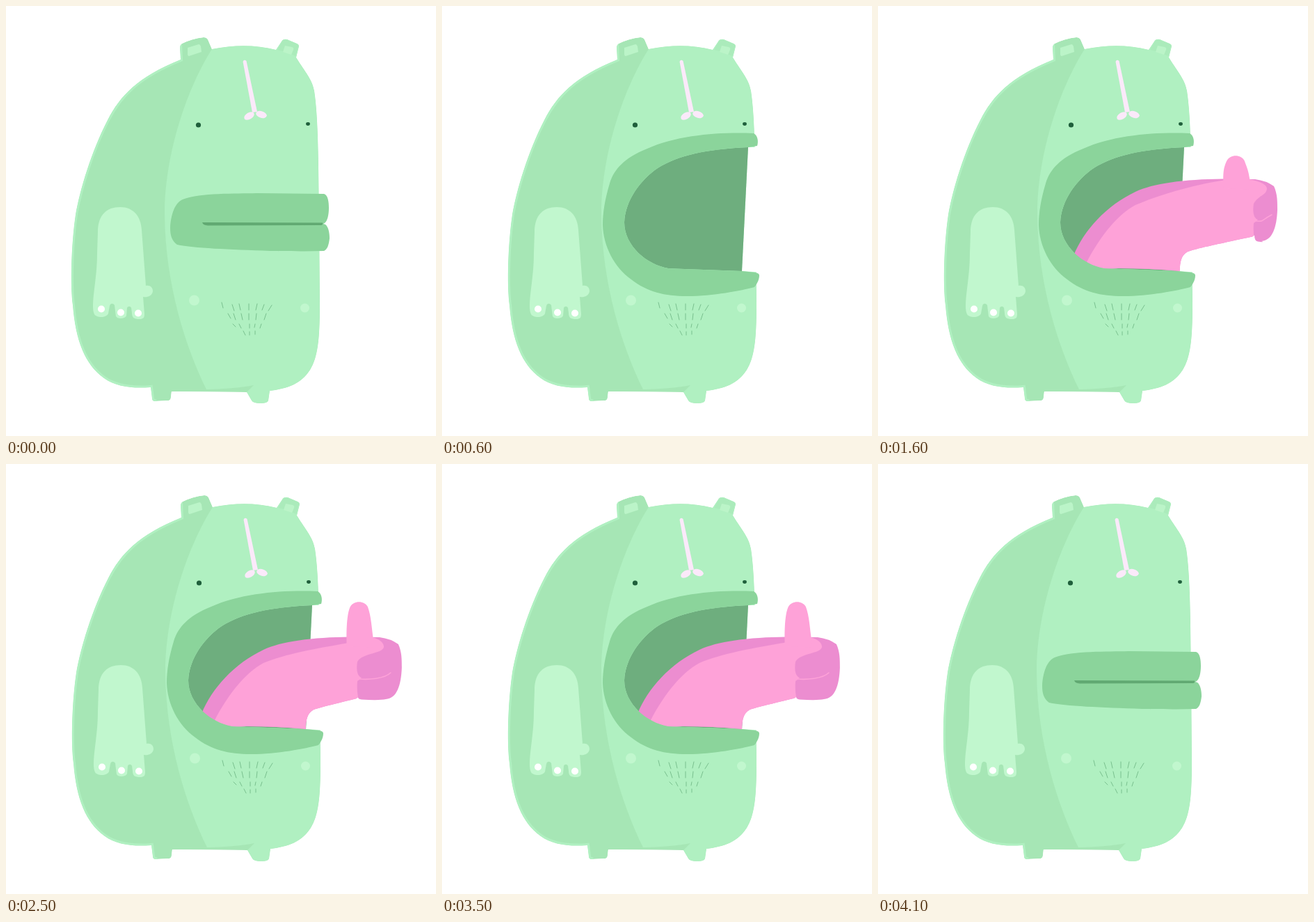
Animation, 618 px wide and 618 px high, one loop 4200 ms. Source, as an HTML page with a canvas:

```html
<!DOCTYPE html>
<html lang="en">
<head>
<meta charset="utf-8">
<title>Thumbs up</title>
<style>
html, body { margin: 0; width: 100%; height: 100%; overflow: hidden; background: #fff; }
canvas { display: block; width: 618px; height: 618px; }
</style>
</head>
<body>
<canvas id="stage"></canvas>
<script>
const SIZE = 618, LOOP = 4200;
const canvas = document.getElementById('stage');
const ctx = canvas.getContext('2d');
const dpr = window.devicePixelRatio || 1;
canvas.width = canvas.height = SIZE * dpr;

const C = {
  face: '#b0f0c1', side: '#a6e6b5', ear: '#abebbb', pale: '#c1f7ce', inner: '#bbf4c8',
  lip: '#8bd49b', deep: '#6eae7e', slit: '#61a972', hair: '#79c08e', eye: '#1f5f3b',
  nose: '#fbe9fa', pink: '#fea2d8', rose: '#ec8dd0', white: '#fff'
};

function fill(d, color) {
  ctx.fillStyle = color;
  ctx.fill(new Path2D(d));
}
function stroke(d, color, width) {
  ctx.strokeStyle = color;
  ctx.lineWidth = width;
  ctx.stroke(new Path2D(d));
}
function dot(x, y, rx, color, ry = rx, turn = 0) {
  ctx.fillStyle = color;
  ctx.beginPath();
  ctx.ellipse(x, y, rx, ry, turn, 0, Math.PI * 2);
  ctx.fill();
}
function clipped(d, paint) {
  ctx.save();
  ctx.clip(new Path2D(d));
  paint();
  ctx.restore();
}

// Body
const BACK = 'C189 102 164 129 146 164 C123 208 106 265 100 300 C94 340 92 400 96 430 ' +
  'C100 480 113 515 141 535 C158 547 180 550 208 548 L210 564 Q210 568 214 568';
const BODY = 'M251 77 ' + BACK + ' L234 567 Q237 566 237 562 L238 554 L346 555 L353 567 ' +
  'Q355 571 366 571 Q376 571 377 567 L379 553 C405 550 424 543 437 523 C448 505 451 480 451 430 ' +
  'L450 300 C449 230 449 160 443 122 C440 105 430 95 417 74 L421 58 Q421 55 418 54 L404 48 ' +
  'Q398 47 396 51 L388 63 Q345 52 296 62 L290 48 Q288 45 284 45 Q267 47 253 54 Q250 56 250 60 Z';
const FACE = 'M296 62 C262 115 228 210 228 300 C229 400 258 490 288 551 ' +
  'Q330 550 356 545 L345 556 L350 590 L500 590 L500 0 L296 0 Z';
const ARM = 'M132 325 C132 300 145 289 164 289 C183 289 194 302 195 322 L201 402 ' +
  'C207 401 211 404 211 410 C210 417 203 419 197 418 L199 443 C199 448 197 450 192 450 ' +
  'C184 450 181 448 181 441 L180 434 C179 431 175 431 174 434 L173 445 C171 450 160 450 158 446 ' +
  'L156 430 C154 427 150 427 149 431 L147 442 C144 449 130 448 127 443 C124 437 125 425 126 415 ' +
  'C129 390 131 375 131 355 Z';
// x, y, dx, dy of each hair
const HAIRS = [
  [310, 426, 2, 8], [325, 429, 3, 9], [335, 428, 2, 9], [349, 428, 0, 9], [361, 428, -2, 9],
  [371, 429, -3, 8], [382, 430, -5, 8],
  [319, 442, 4, 7], [327, 442, 3, 9], [338, 442, 2, 9], [349, 442, 0, 9], [360, 442, -1, 9], [374, 442, -3, 9],
  [326, 457, 4, 4], [335, 457, 3, 6], [350, 457, 0, 6], [358, 457, -1, 5], [367, 457, -2, 6],
  [341, 467, 3, 6], [350, 468, 0, 5], [358, 467, 0, 5]
];

function drawBody() {
  clipped(BODY, () => {
    fill(BODY, C.side);
    stroke('M250 56 L251 77 ' + BACK, C.face, 6);
    fill(FACE, C.face);
  });
  fill('M390 63 L397 51 Q399 48 404 49 L417 54 Q420 55 420 58 L416 72 Q404 66 390 63 Z', C.ear);
  fill('M261 60 L277 55 Q279 55 280 58 L281 66 L263 72 Q261 72 261 69 Z', C.inner);
  fill('M401 57 L411 59 Q414 60 413 63 L410 70 L398 66 Z', C.inner);
  fill(ARM, C.pale);
  dot(137, 435.5, 5, C.white);
  dot(165, 440.5, 5, C.white);
  dot(190, 441.5, 5, C.white);

  fill('M340.5 80 Q342 76 345.5 79 L361 152 L354 153 Z', C.nose);
  dot(349.5, 158, 8, C.nose, 4.8, -0.55);
  dot(367, 156, 8, C.nose, 4.8, 0.3);
  dot(276.5, 171, 3.6, C.eye);
  dot(434, 169.5, 2.9, C.eye, 2.4);
  dot(270.5, 423, 7.5, C.pale);
  dot(429.5, 434, 6.5, C.pale);
  stroke(HAIRS.map(([x, y, dx, dy]) => `M${x} ${y} l${dx} ${dy}`).join(''), C.hair, 1);
}

// Mouth
function closedMouth() {
  fill('M236 318 C237 300 243 282 254 278 C280 268 330 270 360 269 L457 270 C463 272 464 282 464 290 ' +
    'C464 300 462 309 458 312 L456 313 L459 314 C463 317 465 325 465 334 C464 343 462 350 457 352 ' +
    'C430 353 400 352 380 352 C320 350 270 348 246 343 C238 337 236 330 236 318 Z', C.lip);
  fill('M282 311 L455 311.5 Q456 314 453 315 L290 315.5 Q283 315 282 311 Z', C.slit);
}

const INNER = 'L431 381 L335 377.5 L325 377 C295 372 262 345 262 311 C263 280 285 250 310 233 C340 214 380 206 440 203';
const LIPS = 'M448 183 C400 181 340 185 295 205 C262 218 247 235 241 255 C234 278 231 298 231 315 ' +
  'C232 345 247 375 272 393 C295 411 320 417 352 417 C390 417 430 409 449 404 C454 398 456 392 456 387 ' +
  'Q456 384 450 383 ' + INNER + ' L453 201 C455 195 454 186 448 183 Z';

function openMouth(tongue) {
  fill('M440 203 L462 203 L462 383 L431 381 Z', C.white);
  fill('M440 203 ' + INNER + ' Z', C.deep);
  if (tongue) tongue();
  fill(LIPS, C.lip);
}

function halfMouth() {
  ctx.save();
  ctx.translate(232, 215);
  ctx.scale(229 / 225, 242 / 234);
  ctx.translate(-231, -183);
  openMouth();
  ctx.restore();
}

// Tongue
const ROOT = ' Q390 377 345 377 L325 378 Q310 376 298 367 Z';
const TOP = 'M281 359 C296 322 328 287 370 267 C395 255 ';
const BAND = 'M300 368 C320 330 345 299 370 286 C400 273 450 ';
const under = x => ` C465 347 ${x + 15} 351 ${x + 10} 354 C${x + 3} 358 ${x} 367 ${x} 381` + ROOT;

function plainTongue(outline, light) {
  fill(outline, C.rose);
  clipped(outline, () => fill(light, C.pink));
}
const small = () => plainTongue(
  'M278 356 C305 338 340 330 375 330 C412 330 445 345 445 362 C445 372 439 382 433 382' + ROOT,
  'M300 368 C325 354 365 345 405 328 L470 320 L470 390 L300 390 Z');
const bump = () => plainTongue(
  'M275 350 C290 325 305 309 325 296 C345 281 365 266 390 265.5 C422 265 445 290 445 330 C445 350 440 370 433 382' + ROOT,
  'M300 368 C325 330 370 290 410 267 L470 260 L470 390 L300 390 Z');
const mid = () => plainTongue(
  TOP + '435 249 462 249 C485 249 497 266 497 288 C497 315 490 332 478 343' + under(433),
  BAND + '260 482 251 L520 250 L520 400 L300 400 Z');
const long = () => plainTongue(
  TOP + '440 249 495 248.5 C535 246 571 256 571 290 C571 322 550 330 511 337' + under(433),
  BAND + '256 520 249 L600 245 L600 400 L300 400 Z');

// x: right edge, f: left edge of the folded fingers, tx/ty: thumb corner
function hand(x, f, tx, ty) {
  const reach = f - 507;
  const low = 337 - reach / 6;
  const band = 257 - reach / 5;
  const outline = TOP + `440 249 495 248.5 L${x - 32} 249 Q${x - 16} 251 ${x - 5} 259 ` +
    `C${x} 270 ${x} 280 ${x} 293 C${x - 1} 318 ${x - 7} 337 ${x - 23} 338 ` +
    `Q${(x + f) / 2} 340 ${f + 6} 338.5 Q${f + 1} 338 ${f + 1} ${low - 2} L${f - 2} ${low}` +
    under(431 + reach / 12);
  const tip = f > 530 ? 559 : f + 38;
  const light = BAND + `${band + 7} ${tx} ${band} L${tx + 37} 249 Q${tip} 254 ${tip} 263 ` +
    `C${tip - 2} 273 ${f + 8} 271 ${f} 284 C${f - 2} 296 ${f} 305 ${f + 6} 307 ` +
    `Q${f + 3} 310 ${f} 312 Q${f - 1} 326 ${f + 1} 335 L${f} 400 L300 400 Z`;
  plainTongue(outline, light);
  stroke(`M${f + 3} 309 C${f + 15} 310 ${x - 25} 309 ${x - (f > 530 ? 8 : 16)} 300`, C.pink, 1.6);
  fill(`M${tx} 262 C${tx - 1} 240 ${tx} ${ty + 17} ${tx + 5} ${ty + 7} ` +
    `C${tx + 10} ${ty - 2} ${tx + 25} ${ty - 2} ${tx + 30} ${ty + 7} ` +
    `C${tx + 35} ${ty + 20} ${tx + 36} 238 ${tx + 38} 251 L${tx + 38} 264 Z`, C.pink);
}
const rising = () => hand(574, 540, 496.5, 215);
function thumbsUp(t) {
  const step = Math.floor(t / 100) * 100;
  const dx = 3.2 * Math.cos((step - 2040) / 1200 * Math.PI * 2);
  hand(571.2 + dx, 507.4 + dx, 492.2 + dx, 198);
}

// Each pose lasts until its time
const POSES = [
  [400, 'closed'], [600, 'half'], [800, null], [1000, small], [1200, bump], [1400, mid],
  [1600, long], [1800, rising], [3600, thumbsUp], [3700, rising], [3800, mid],
  [3900, bump], [4000, small], [4100, 'half'], [LOOP, 'closed']
];

function draw(t) {
  const pose = POSES.find(([end]) => t < end)[1];
  const still = pose === 'closed' || pose === 'half';
  ctx.setTransform(dpr, 0, 0, dpr, 0, 0);
  ctx.fillStyle = C.white;
  ctx.fillRect(0, 0, SIZE, SIZE);
  ctx.lineCap = 'round';
  ctx.save();
  if (!still) ctx.translate(1, 0);
  drawBody();
  ctx.restore();
  if (pose === 'closed') closedMouth();
  else if (pose === 'half') halfMouth();
  else openMouth(pose && (() => pose(t)));
}

const start = performance.now();
function tick() {
  draw((performance.now() - start) % LOOP);
  requestAnimationFrame(tick);
}
tick();
</script>
</body>
</html>
```
